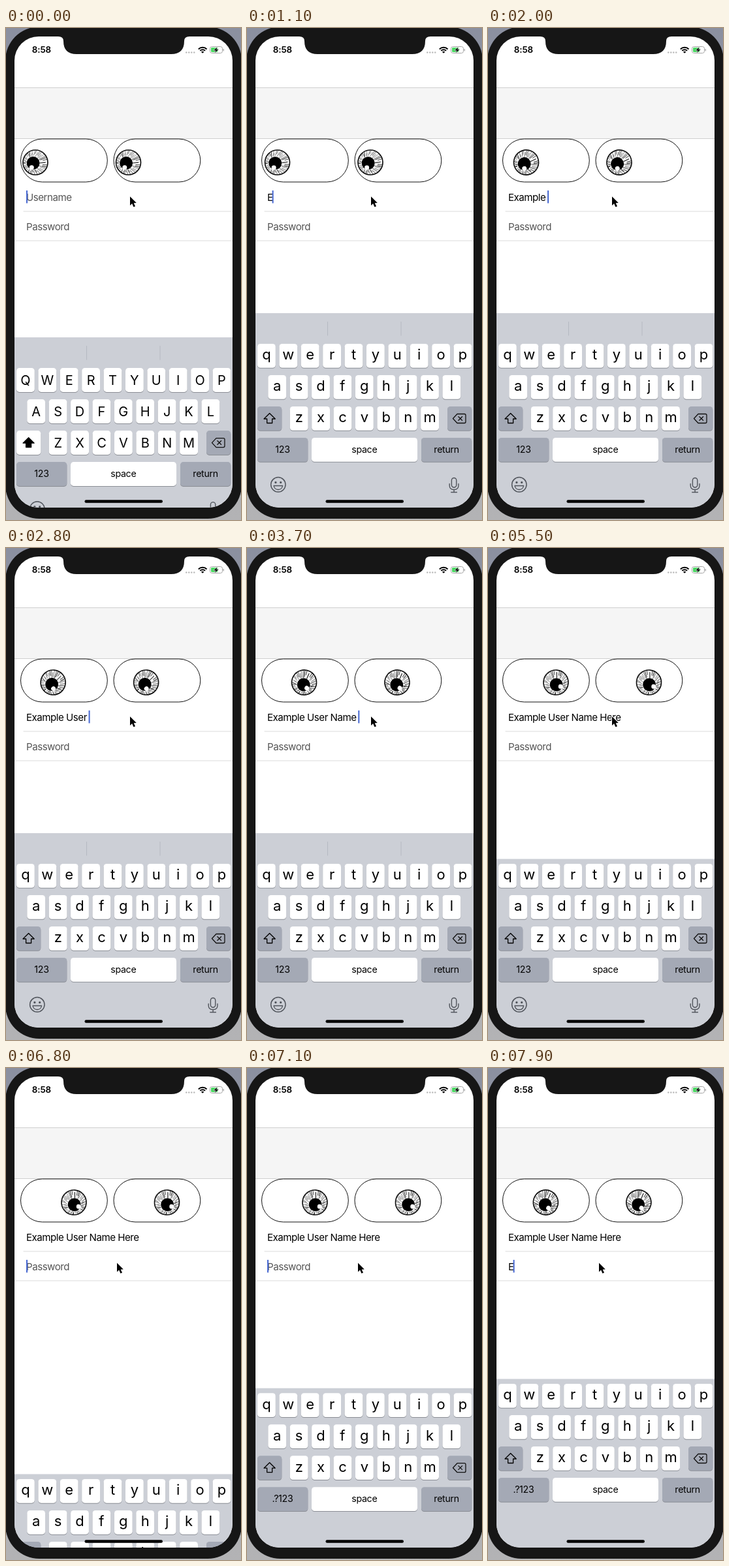
An HTML page with a canvas for the animation above (8 s loop, 360 px wide and 754 px high).

```html
<!DOCTYPE html>
<html lang="en">
<head>
<meta charset="utf-8">
<title>Login eyes</title>
<style>
  html, body { margin: 0; width: 100%; height: 100%; overflow: hidden; background: #9a9da6; }
  canvas { display: block; width: 360px; height: 754px; }
</style>
</head>
<body>
<canvas id="stage"></canvas>
<script>
const W = 360, H = 754, LOOP = 8000;
const FONT = 'Inter, Roboto, sans-serif';
const canvas = document.getElementById('stage');
const ctx = canvas.getContext('2d');
const dpr = window.devicePixelRatio || 1;
canvas.width = W * dpr;
canvas.height = H * dpr;

const USER = 'Example User Name Here';
const ROWS = [['qwertyuiop', 16, 484], ['asdfghjkl', 32.3, 532], ['zxcvbnm', 65.8, 580]];
const SPECIAL = '#a4a9b5';

// Time and value pairs, joined by straight segments
const TYPED = [[800, 1], [1150, 2], [1950, 8], [3650, 18], [4400, 22]];
const GAZE = [[800, 45], [1100, 46.5], [1600, 51.5], [2000, 58.5], [3700, 87.5],
  [4750, 104], [7700, 104], [7800, 98], [7900, 88.5], [8000, 76]];

function track(points, t) {
  if (t <= points[0][0]) return points[0][1];
  for (let i = 1; i < points.length; i++) {
    const [t0, a] = points[i - 1], [t1, b] = points[i];
    if (t < t1) return a + (b - a) * (t - t0) / (t1 - t0);
  }
  return points[points.length - 1][1];
}

// Critically damped spring, falling from 1 to 0
function settle(ms) {
  const k = Math.max(0, ms) * 0.0105;
  return (1 + k) * Math.exp(-k);
}

function random(seed) {
  return () => (seed = (seed * 16807) % 2147483647) / 2147483647;
}

function fillBox(x, y, w, h, r, color) {
  ctx.beginPath();
  ctx.roundRect(x, y, w, h, r);
  ctx.fillStyle = color;
  ctx.fill();
}

function rect(x, y, w, h, color) {
  ctx.fillStyle = color;
  ctx.fillRect(x, y, w, h);
}

function disc(x, y, r, color) {
  ctx.beginPath();
  ctx.arc(x, y, r, 0, Math.PI * 2);
  ctx.fillStyle = color;
  ctx.fill();
}

function setFont(size, spacing = 0, weight = 400) {
  ctx.font = `${weight} ${size}px ${FONT}`;
  ctx.letterSpacing = spacing + 'px';
}

function text(str, x, y, color = '#000', align = 'left') {
  ctx.textAlign = align;
  ctx.fillStyle = color;
  ctx.fillText(str, x, y);
}

function poly(points) {
  ctx.beginPath();
  points.forEach(([x, y]) => ctx.lineTo(x, y));
  ctx.closePath();
}

function strokePath(d, color, width) {
  ctx.strokeStyle = color;
  ctx.lineWidth = width;
  ctx.stroke(new Path2D(d));
}

function drawStatus() {
  setFont(13.4, -0.1, 600);
  text('8:58', 39.8, 38.3);
  for (let i = 0; i < 4; i++) disc(276.3 + i * 4, 37.5, 1.2, '#b9b9b9');

  ctx.save();
  ctx.beginPath();
  ctx.moveTo(301.2, 38.8);
  ctx.arc(301.2, 38.8, 11, -Math.PI * 0.75, -Math.PI * 0.25);
  ctx.clip();
  ctx.strokeStyle = '#000';
  ctx.lineWidth = 2;
  for (const r of [5.6, 9]) {
    ctx.beginPath();
    ctx.arc(301.2, 38.8, r, 0, Math.PI * 2);
    ctx.stroke();
  }
  disc(301.2, 38.8, 3, '#000');
  ctx.restore();

  ctx.beginPath();
  ctx.roundRect(312.5, 28.5, 19, 10, 3);
  ctx.strokeStyle = '#a5a5a5';
  ctx.lineWidth = 1;
  ctx.stroke();
  fillBox(314, 30, 10.5, 7, 1.4, '#4cd964');
  fillBox(332.6, 32, 1.3, 3.4, 0.6, '#a5a5a5');
  poly([[323.5, 29.2], [318, 34.4], [321.2, 34.4], [320, 38], [325.8, 32.7], [322.5, 32.7]]);
  ctx.strokeStyle = '#fff';
  ctx.lineWidth = 1;
  ctx.stroke();
  ctx.fillStyle = '#111';
  ctx.fill();
}

function drawEye(cx, cy, angle) {
  const px = -3.4, py = 1;
  ctx.save();
  ctx.translate(cx, cy);
  ctx.rotate(angle);
  disc(0, 0, 19, '#fff');
  ctx.strokeStyle = '#111';
  const rnd = random(41);
  for (let i = 0; i < 46; i++) {
    const a = (i + rnd() * 0.7) / 46 * Math.PI * 2;
    const c = Math.cos(a), s = Math.sin(a);
    const x0 = px + c * 10, y0 = py + s * 10;
    const x1 = c * 18.6, y1 = s * 18.6;
    const from = i % 3 ? rnd() * 0.45 : 0;
    const to = i % 3 ? 1 : 0.6 + rnd() * 0.4;
    ctx.lineWidth = 0.4 + rnd() * 0.45;
    ctx.beginPath();
    ctx.moveTo(x0 + (x1 - x0) * from, y0 + (y1 - y0) * from);
    ctx.lineTo(x0 + (x1 - x0) * to, y0 + (y1 - y0) * to);
    ctx.stroke();
  }
  ctx.lineWidth = 1.7;
  ctx.beginPath();
  ctx.arc(0, 0, 19, 0, Math.PI * 2);
  ctx.stroke();
  disc(px, py, 10, '#000');
  disc(-5.7, 7.8, 3.5, '#fff');
  ctx.restore();
}

function drawEyes(t) {
  const x = track(GAZE, t);
  const angle = -(x - 45) * 1.44 * Math.PI / 180;
  for (const dx of [0, 142.5]) {
    ctx.beginPath();
    ctx.roundRect(22.5 + dx, 170, 132.8, 66, 33);
    ctx.fillStyle = '#fff';
    ctx.fill();
    ctx.strokeStyle = '#111';
    ctx.lineWidth = 1;
    ctx.stroke();
    drawEye(x + dx, 206, angle);
  }
}

function drawField(value, hint, baseline, focused) {
  setFont(15.14, -0.5);
  text(value || hint, 31, baseline, value ? '#000' : '#555');
  if (!focused) return;
  const x = Math.max(31, 30 + ctx.measureText(value).width);
  rect(x, baseline - 15.5, 2, 19.5, '#4667d2');
}

function drawForm(t) {
  rect(13, 91, 334, 78.5, '#f5f5f5');
  rect(13, 91, 334, 1, '#cfcfcf');
  rect(13, 169, 334, 1, '#cfcfcf');
  drawEyes(t);
  rect(26.5, 280.5, 321, 1, '#dcdcdc');
  rect(13, 325.5, 334, 1, '#dcdcdc');
  const count = t < 800 ? 0 : Math.floor(track(TYPED, t) + 1e-6);
  drawField(USER.slice(0, count), 'Username', 264.5, t < 5480);
  drawField(t < 7800 ? '' : 'E', 'Password', 309.5, t >= 6660);
}

function key(x, y, w, color = '#fff') {
  fillBox(x, y + 1, w, 36.8, 4.5, '#8b8e95');
  fillBox(x, y, w, 36.8, 4.5, color);
}

function drawShift(active) {
  key(16, 580, 37.3, active ? '#fff' : SPECIAL);
  poly([[34.6, 590.5], [43.2, 599], [38.6, 599], [38.6, 605.5], [30.6, 605.5], [30.6, 599], [26, 599]]);
  ctx.lineJoin = 'round';
  ctx.strokeStyle = ctx.fillStyle = '#000';
  ctx.lineWidth = 1.3;
  ctx.stroke();
  if (active) ctx.fill();
}

function drawDelete() {
  key(307, 580, 37.3, SPECIAL);
  strokePath('M322 591.5H333Q335 591.5 335 593.5V603.5Q335 605.5 333 605.5H322L315.5 598.5Z', '#111', 1.3);
  strokePath('M323.5 595.2L330 601.7M330 595.2L323.5 601.7', '#111', 1.3);
}

function drawExtras() {
  const ink = '#50545b';
  ctx.lineCap = 'round';
  ctx.beginPath();
  ctx.arc(47.8, 699.8, 11.2, 0, Math.PI * 2);
  ctx.strokeStyle = ink;
  ctx.lineWidth = 1.5;
  ctx.stroke();
  disc(43.9, 696.4, 1.6, ink);
  disc(51.7, 696.4, 1.6, ink);
  strokePath('M41 701.5H54.6Q53.5 707.5 47.8 707.5Q42.1 707.5 41 701.5Z', ink, 1.3);
  ctx.beginPath();
  ctx.roundRect(313.4, 689.5, 7.4, 14.5, 3.7);
  ctx.lineWidth = 1.4;
  ctx.stroke();
  strokePath('M310.2 698.5V701Q310.2 707.5 317.1 707.5Q324 707.5 324 701V698.5M317.1 707.5V711.5M312.8 711.5H321.4', ink, 1.4);
  ctx.lineCap = 'butt';
}

function drawKeyboard(offset, { bar, upper, secure }) {
  ctx.save();
  ctx.translate(0, offset);
  const top = bar ? 437 : 476.5;
  rect(13, top, 334, 760 - top, '#cccfd6');
  if (bar) for (const x of [123, 235.5]) rect(x, 450, 1, 21.5, '#b5b9c1');

  for (const [letters, x0, y] of ROWS) {
    [...letters].forEach((ch, i) => {
      const x = x0 + i * 33.4;
      key(x, y, 27.8);
      setFont(upper ? 20 : 22);
      text(upper ? ch.toUpperCase() : ch, x + 13.9, y + (upper ? 25.8 : 24.4), '#000', 'center');
    });
  }
  drawShift(upper);
  drawDelete();

  key(16, 628, 77.3, SPECIAL);
  key(99, 628, 162);
  key(267, 628, 77.3, SPECIAL);
  setFont(14.2, -0.3);
  text(secure ? '.?123' : '123', 54.5, 651.3, '#000', 'center');
  text('space', 179.8, 650.8, '#000', 'center');
  text('return', 305.6, 650.8, '#000', 'center');
  if (!secure) drawExtras();
  ctx.restore();
}

function drawKeyboardAt(t) {
  if (t < 5480) {
    drawKeyboard(298 * settle(t + 343), { bar: true, upper: t < 800 });
  } else if (t < 6400) {
    drawKeyboard(258.5 * (1 - settle(t - 5500)), {});
  } else if (t >= 6660) {
    drawKeyboard(258.5 * settle(t - 6660), { secure: true });
  }
}

function drawPointer(t) {
  const k = Math.min(1, Math.max(0, (t - 6130) / 270));
  ctx.save();
  ctx.translate(190 - 20 * k, 258.3 + 40.5 * k);
  poly([[0, 0], [0, 13.6], [3.1, 10.8], [5.4, 16], [8, 14.9], [5.7, 9.9], [9.8, 9.7]]);
  ctx.lineJoin = 'round';
  ctx.strokeStyle = '#fff';
  ctx.lineWidth = 2;
  ctx.stroke();
  ctx.fillStyle = '#000';
  ctx.fill();
  ctx.restore();
}

function drawNotch() {
  ctx.fillStyle = '#161616';
  ctx.fill(new Path2D('M80 12H281V13Q273 13 273 20Q273 40 253 40H108Q88 40 88 20Q88 13 80 13Z'));
}

function draw(t) {
  ctx.setTransform(dpr, 0, 0, dpr, 0, 0);
  const back = ctx.createLinearGradient(0, 0, 0, H);
  back.addColorStop(0, '#8b90a0');
  back.addColorStop(1, '#b3b3b5');
  rect(0, 0, W, H, back);
  fillBox(-1, -2, 362, 754, 52, '#161616');

  ctx.save();
  ctx.beginPath();
  ctx.roundRect(13, 13, 334, 722, 37);
  ctx.clip();
  rect(13, 13, 334, 722, '#fff');
  drawStatus();
  drawForm(t);
  drawKeyboardAt(t);
  fillBox(120.5, 723.3, 119.5, 4.5, 2.2, '#000');
  ctx.restore();

  drawNotch();
  drawPointer(t);
}

const start = performance.now();
function tick() {
  draw((performance.now() - start) % LOOP);
  requestAnimationFrame(tick);
}
tick();
</script>
</body>
</html>
```
